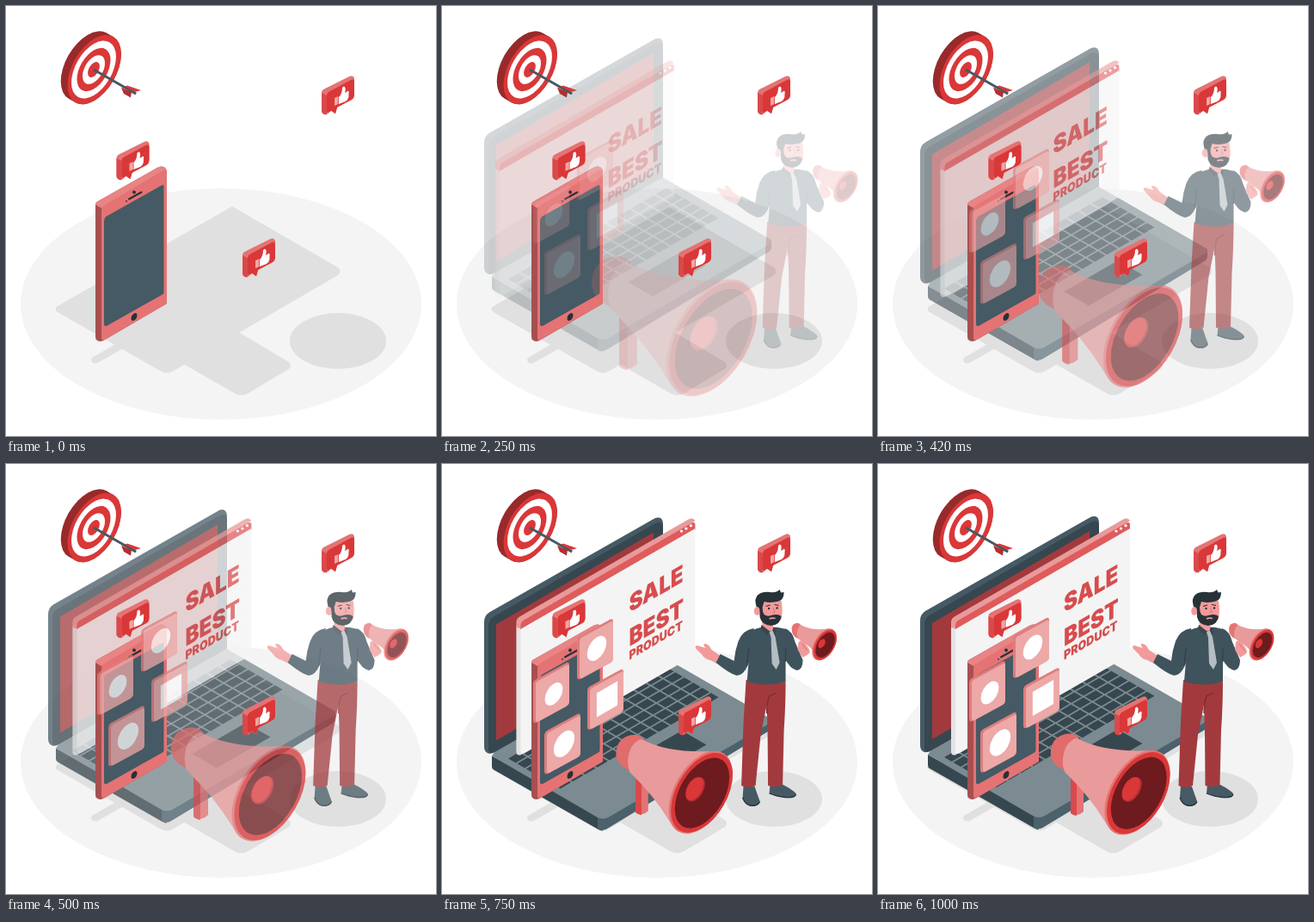
Recreate the animation shown at these times as an HTML page. Size 500x500 px, loop 1040 ms.

```html
<!DOCTYPE html>
<html lang="en">
<head>
<meta charset="utf-8">
<title>Mobile marketing</title>
<style>
html, body { margin: 0; width: 100%; height: 100%; overflow: hidden; background: #fff; }
svg { display: block; width: 100vw; height: 100vh; }
text { font-family: Inter, "Open Sans", Arial, sans-serif; font-weight: 900; fill: #d84c4d; }
.red { fill: #da3738; } .mid { fill: #e57373; } .pale { fill: #e99a9a; }
.deep { fill: #a23a3d; } .wine { fill: #6d1b1e; }
.slate { fill: #455a64; } .shirt { fill: #3f535d; } .dark { fill: #37474f; } .ink { fill: #263238; }
.skin { fill: #f29a9a; } .white { fill: #fff; }
.enter { opacity: 0; }
</style>
</head>
<body>
<svg viewBox="0 0 500 500">
  <defs>
    <g id="bubble">
      <path class="mid" d="M0 20Q0 17 3 15.500L32 1Q37-1 38 3V22Q38 25 35 27L18.500 36L16 44.500L11 41L7 44.500Q4 46 2 44Q0 43 0 41Z"/>
      <path fill="#d9494b" d="M0 20L6 23V45Q3 46 1.500 44Q0 43 0 41Z"/>
      <path class="red" d="M6 23Q6 20 9 18.500L34 5Q38 3 38 7V23Q38 26 35 28L18 37L16 44L11 40.500L9 42Q6 44 6 40.500Z"/>
      <path fill="#f0a6a6" d="M15 26L19.300 24V33L15 35Z"/>
      <path class="white" d="M20 25Q24 21 24 14Q26 11 27.500 14Q28 17 27 20L31 17.500Q32.300 19 31.500 21Q32 25 30 28Q28 30.500 25 31L20 33Z"/>
    </g>
    <g id="tile">
      <path fill="#e07c7c" d="M0 25Q0 22 3 20L38 1Q42-1 42 3V46Q42 49 39 51L5 69.500Q0 72 0 67Z"/>
      <path fill="#eda8a8" d="M3 26Q3 23 6 21.500L39 3.500Q42 2 42 5V46Q42 49 39 51L6 69Q3 70 3 67Z"/>
    </g>
  </defs>

  <ellipse cx="250" cy="346.500" rx="233" ry="134.500" fill="#f4f4f4"/>
  <g fill="#e0e0e0">
    <path d="M263 233L386 304Q391 308 386 313L195 424Q187 429 179 424L60 356Q55 352 60 349Z"/>
    <path d="M100 409L150 380L160 385L108 414Q104 417 100 414Q98 411 100 409Z"/>
    <path d="M206 416L270 379L329 414Q333 418 329 422L282 450Q274 455 265 450Z"/>
    <ellipse cx="386" cy="389.500" rx="56" ry="32.500"/>
  </g>

  <g id="laptop" class="enter">
    <path class="dark" d="M58 338L187 408V425Q184 425 181 423L60 354Q58 353 58 350Z"/>
    <path fill="#4b616c" d="M181 408L383 295V304Q383 307 380 309L193 422Q187 426 181 423Z"/>
    <path fill="#7c8b91" d="M58 338L62 332L254 221L381 294Q385 297 381 300L194 409Q187 413 180 409Z"/>
    <g transform="matrix(.866 -.5 .866 .5 58 338)" class="dark">
      <path id="keys"/>
      <path d="M85 98h72v33h-72z"/>
    </g>
    <path class="slate" d="M49 182Q49 175 55 171L245 63Q251 59 255 62Q257 64 257 69V222L62 333Q56 337 52 334Q49 332 49 327Z"/>
    <path class="dark" d="M54 186Q54 180 60 176L247 68Q257 63 257 74V222L60 334Q54 336 54 330Z"/>
    <path class="deep" d="M63 185L246 78V214L63 320Z"/>
  </g>

  <g id="page" class="enter">
    <path fill="#e3e3e3" d="M85 188L91 191V338Q85 340 85 334Z"/>
    <path class="pale" d="M85 183Q85 180 88 178L284 65Q290 61 293 66L91 192L85 190Z"/>
    <path fill="#df5b5c" d="M90 187Q90 184 93 182L288 69Q293 66 293 71V77L90 193Z"/>
    <path fill="#f4f4f4" d="M90 192L293 75V222L95 336Q90 339 90 334Z"/>
    <g class="white">
      <circle cx="277" cy="78" r="1.600"/><circle cx="282.500" cy="75" r="1.600"/><circle cx="288" cy="71.700" r="1.600"/>
    </g>
    <g transform="matrix(.866 -.5 0 1 216 174)">
      <text font-size="28" y="-1">SALE</text>
      <text font-size="28" y="38.500">BEST</text>
      <text font-size="14.500" y="54">PRODUCT</text>
    </g>
  </g>

  <g id="phone">
    <path fill="#a64f50" d="M104 232Q104 228 107 227L176 188Q181 185 185 188Q187 190 187 194V346L115 388Q109 392 105 388Q104 387 104 384Z"/>
    <path fill="#e98485" d="M104 231Q104 228 107 227L176 188Q181 185 185 188L187 192L111 235Z"/>
    <path fill="#e57374" d="M111 238Q111 234 114 232L181 192Q187 189 187 195V346L115 388Q111 390 111 386Z"/>
    <path class="slate" d="M114 250Q114 247 116 245L181 208.500Q183.500 207 183.500 210V333Q183.500 335 181 336L117 372Q114 373 114 370Z"/>
    <path d="M143 224.500L157.500 216.500" stroke="#263238" stroke-width="2" stroke-linecap="round"/>
    <circle class="ink" cx="149" cy="216.500" r="1.900"/><circle class="ink" cx="140" cy="227" r=".9"/>
    <circle class="ink" r="4" transform="matrix(.866 -.5 0 1 149 361.500)"/>
  </g>

  <g transform="matrix(.866 -.5 0 1 102 74)">
    <path d="M.8.4L-8.200-8.500" stroke="#982a2b" stroke-width="72" stroke-linecap="round"/>
    <circle class="red" cx=".8" cy=".4" r="36"/><circle class="white" r="30"/><circle class="red" r="22.500"/>
    <circle class="white" r="15"/><circle class="red" r="8"/>
  </g>
  <path d="M102 74L151 102" stroke="#455a64" stroke-width="3"/>
  <path class="red" d="M134 95L141 92.500L157 98L150 100Z"/>
  <path fill="#b52d2f" d="M134 95L137 102L145 106.500L146 100Z"/>
  <path d="M137 94L151 102" stroke="#455a64" stroke-width="2.500"/>

  <g id="tiles" class="enter">
    <use href="#tile" x="157" y="178.500"/><use href="#tile" x="106" y="229"/>
    <use href="#tile" x="119" y="288.500"/><use href="#tile" x="169" y="237"/>
    <g class="white">
      <circle r="13" transform="matrix(.866 -.5 0 1 180 213)"/>
      <circle r="12" transform="matrix(.866 -.5 0 1 130 266)"/>
      <circle r="14" transform="matrix(.866 -.5 0 1 142 324)"/>
      <rect x="-14" y="-14" width="28" height="28" transform="matrix(.866 -.5 0 1 192 272)"/>
    </g>
  </g>

  <g id="man" class="enter">
    <path class="slate" d="M352 374L351 388Q354 397 361 398Q370 398 371 392Q368 384 365 375Z"/>
    <path class="slate" d="M383 372L382 383Q392 387 400 388Q413 389 413 383Q408 378 398 373Z"/>
    <path d="M351 388Q354 396.500 361 397.300Q369 397.500 371 392.500M382 383Q392 387 400 387.500Q412 388.500 413 384" fill="none" stroke="#263238" stroke-width="1.300"/>
    <path class="deep" d="M355 251Q378 259 401 253Q401 280 399 310L397.500 373Q390 377 380.500 374L380 310L379 280L372 315L366 374Q357 378 349.500 374L352 300Z"/>
    <path d="M379 290Q379 277 382 270L390 266" fill="none" stroke="#7c2a2d" stroke-width="1.300"/>
    <path class="skin" d="M325 223L315 216Q311 208 306 209Q305 211 308 214L298 211Q294 212 298 216L303 221Q307 227 313 228L321 232Z"/>
    <path class="shirt" d="M364 191Q351 193 346 206Q342 217 341 229L325 221L320 231Q336 244 344 246Q352 246 357 234L366 212Z"/>
    <path class="shirt" d="M359 195Q366 191 376 189L392 190Q400 191 404 194Q409 200 407 220L401 228V253Q380 260 356 253L358 230Z"/>
    <path class="shirt" d="M400 191Q409 194 412 207L421 228Q421 239 414 240Q406 238 400 226Z"/>
    <path d="M358 214L356 235M401 214V230" fill="none" stroke="#2f4049" stroke-width="1.200"/>
    <path class="skin" d="M373 175L386 184L387 196L382 194L374 190Z"/>
    <path class="dark" d="M373 187L383 195L379 199L372 191ZM387 190L385 195L389 199L390 191Z"/>
    <path fill="#b4bdc2" d="M382 195L386 194L389 201L394 231L390 239L385 232L384 202Z"/>
    <ellipse class="skin" cx="368" cy="171" rx="3.800" ry="5"/>
    <path class="skin" d="M370 160Q382 156 396 159Q398 171 396 180Q389 187 380 184L371 177Z"/>
    <path class="ink" d="M367 166Q364 156 369 152Q374 148 383 149Q390 150 394 146L395.500 149.500L399 149Q399 158 393 159.500Q384 162 376 160L373 170L371 171Q371 166 367 166Z"/>
    <path class="ink" d="M371 168V178Q373 187 384 188Q395 187 396 177Q392 174 386 175.500Q380 178 376 175Q374 172 374 167Z"/>
    <path d="M382 180Q385 178.500 389 179.500" stroke="#f29a9a" stroke-width="1.600" fill="none"/>
    <path d="M378 165.500L383 164M388 163.500L393 164.500" stroke="#263238" stroke-width="1.200"/>
    <circle class="ink" cx="381.500" cy="168" r="1.200"/><circle class="ink" cx="391" cy="167.500" r="1.200"/>
    <path d="M386.500 167L388.500 172L386 172.500" fill="none" stroke="#da6c6c" stroke-width=".9"/>
    <path class="mid" d="M408 191Q409 184 416 185L421 189L416 203Q408 201 408 191Z"/>
    <path class="pale" d="M418 187Q434 195 452 191L441 228Q433 213 415 203Q412 195 418 187Z"/>
    <path class="skin" d="M416 207Q420 203 423 207L428 215Q431 219 426 222L421 225L415 216Z"/>
    <path d="M420 209L426 217" stroke="#da6c6c" stroke-width=".9"/>
    <g transform="matrix(.866 -.5 0 1 446 210)">
      <circle class="mid" r="16.500"/><circle class="red" cx="1" cy=".8" r="15.600"/>
      <circle class="wine" cx="1.200" cy="1" r="13"/><circle class="red" cx="-3.500" cy="-3" r="4.800"/>
    </g>
  </g>

  <g id="horn" class="enter">
    <path class="mid" d="M224 362L239 374V404Q232 411 224 406Z"/>
    <path fill="#d9494b" d="M224 362L231 368V409Q227 409 224 406Z"/>
    <path fill="#e06c6c" d="M202 328Q205 317 218 314Q228 312 234 319L217 356Q207 352 203 345Q199 337 202 328Z"/>
    <path class="pale" d="M231 318.500Q262 336 320 333L286 430Q272 429 264 416Q246 386 217 358Q212 345 218 330Q223 321 231 318.500Z"/>
    <g transform="matrix(.866 -.5 0 1 301.500 382)">
      <circle class="mid" r="44"/><circle class="red" cx="1.500" cy="1.300" r="42.500"/>
      <circle class="wine" cx="2" cy="1.800" r="37.500"/>
      <circle fill="#b52d2f" cx="-7" cy="-7" r="13"/><circle class="red" cx="-8.500" cy="-8.500" r="12.300"/>
    </g>
  </g>

  <use href="#bubble" x="128.500" y="157"/>
  <use href="#bubble" x="367" y="81"/>
  <use href="#bubble" x="275" y="270"/>
</svg>
<script>
const LOOP = 1040, ENTER = 1000;
const byId = id => document.getElementById(id);

let keys = "";
for (let row = 0; row < 6; row++)
  for (let col = 0; col < 13; col++)
    keys += `M${8 + col * 16.5} ${14 + row * 12}h14.300v10h-14.300z`;
byId("keys").setAttribute("d", keys);

const cubic = (a, b, s) => 3 * a * s * (1 - s) ** 2 + 3 * b * s * s * (1 - s) + s ** 3;

// Ease with a small overshoot
function ease(x) {
  if (x <= 0 || x >= 1) return x <= 0 ? 0 : 1;
  let lo = 0, hi = 1;
  for (let i = 0; i < 30; i++) {
    const s = (lo + hi) / 2;
    if (cubic(.36, .5, s) < x) lo = s; else hi = s;
  }
  return cubic(-.01, 1.38, lo);
}

const slideDown = d => `translate(0 ${-30 * d})`;
const moves = {
  laptop: slideDown,
  tiles: slideDown,
  page: d => `translate(${-30 * d} 0)`,
  man: d => `translate(${30 * d} 0)`,
  horn: d => `translate(270.5 372) scale(${1 + d / 2}) translate(-270.5 -372)`
};
const parts = Object.entries(moves).map(([id, move]) => [byId(id), move]);

function draw(time) {
  const p = ease((time % LOOP) / ENTER);
  for (const [el, move] of parts) {
    el.setAttribute("transform", move(1 - p));
    el.style.opacity = Math.max(0, Math.min(1, p));
  }
}

const start = performance.now();
function tick() {
  draw(performance.now() - start);
  requestAnimationFrame(tick);
}
tick();
</script>
</body>
</html>
```
